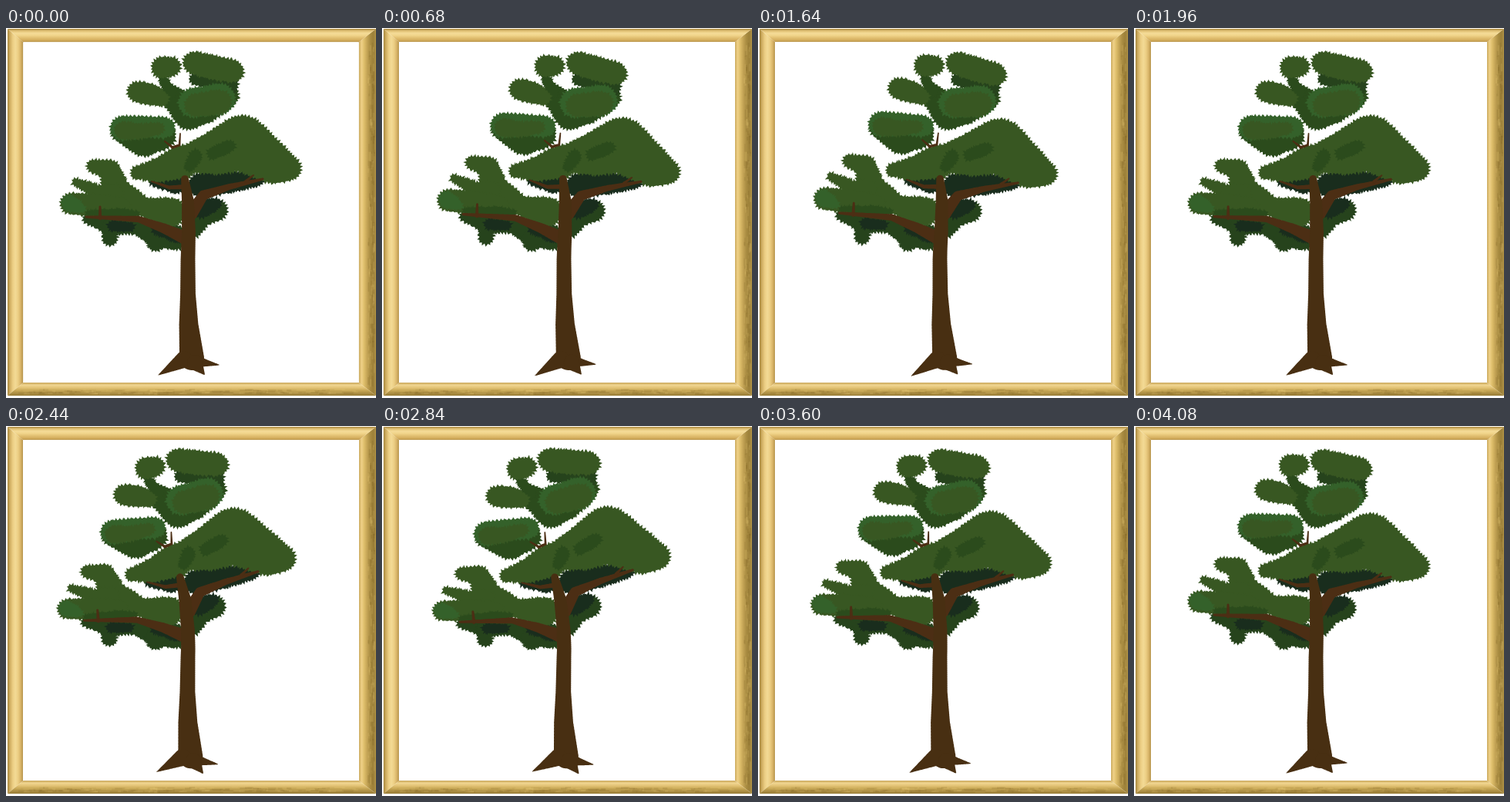
An HTML page with a canvas that plays this animation: 480x480 px, repeating every 4120 ms.

```html
<!DOCTYPE html>
<html lang="en">
<head>
<meta charset="utf-8">
<title>Swaying tree</title>
<style>
html, body { margin: 0; width: 100%; height: 100%; overflow: hidden; background: #fff; }
canvas { display: block; width: 480px; height: 480px; }
</style>
</head>
<body>
<canvas id="stage" width="480" height="480"></canvas>
<script>
const ctx = document.getElementById('stage').getContext('2d');
const LOOP = 4120, STEP = 40;
const LEAF = '#385722', GLOW = '#34612a', MID = '#2b4b1c', SHADE = '#26431c', DEEP = '#192d1d';
const BARK = '#482f12', BRANCH = '#4c2e14';

let seed = 11;
const rnd = () => (seed = (seed * 16807) % 2147483647) / 2147483647;

// A disc whose rim carries random leaf tips when spike > 0.
function disc(x, y, r, spike) {
  const n = 2 * Math.max(6, Math.round(r * 1.4));
  return Array.from({ length: n }, (_, i) => {
    const a = 2 * Math.PI * (i + (rnd() - .5) * .5 * Math.sign(spike)) / n;
    const d = r + spike * (i % 2 ? rnd() * 1.3 : -.5 - rnd() * .5);
    return [x + d * Math.cos(a), y + d * Math.sin(a)];
  });
}

// A chain of discs through "x,y,radius" nodes; gap is the spacing in radii.
function chain(color, text, gap, spike) {
  const nodes = text.split(' ').map(p => p.split(',').map(Number));
  const discs = [disc(...nodes[0], spike)];
  for (let i = 1; i < nodes.length; i++) {
    const [a, b] = [nodes[i - 1], nodes[i]];
    const n = Math.ceil(Math.hypot(b[0] - a[0], b[1] - a[1]) / (gap * (a[2] + b[2]) / 2));
    for (let k = 1; k <= n; k++) {
      const [x, y, r] = a.map((v, j) => v + (b[j] - v) * k / n);
      discs.push(disc(x, y, r, spike));
    }
  }
  shapes.push({ color, discs });
}

const shapes = [];
const leaf = (color, text) => chain(color, text, .42, 2.2);
const wood = (color, text) => chain(color, text, .3, 0);

// Low foliage behind the trunk
leaf(SHADE, '106,247,7 136,257,12 168,257,10 198,270,15 222,272,16');
leaf(SHADE, '135,258,11 135,273,10');
leaf(SHADE, '194,274,13 194,280,10');
leaf(DEEP, '138,257,7 162,258,6');
leaf(DEEP, '195,262,6 222,273,6');
leaf(SHADE, '245,263,9 255,244,13 274,236,14');
leaf(DEEP, '253,235,12 272,228,8');
leaf(DEEP, '252,204,16 285,200,15 326,197,9');
leaf(DEEP, '190,200,5 222,201,14');

// Left crown
leaf(LEAF, '113,179,9 136,184,13 142,212,19 180,233,13 214,239,19');
leaf(LEAF, '91,200,6 118,212,9 140,214,12');
leaf(LEAF, '84,228,14 120,230,15 150,232,12');
leaf(GLOW, '82,227,11 98,234,6');
leaf(MID, '106,240,4 150,240,6 170,241,4');

// Right crown and the part before the trunk
leaf(LEAF, '242,169,20 278,160,30 306,149,36 345,175,27 366,182,17');
leaf(LEAF, '170,188,9 200,184,16 228,174,22');
leaf(MID, '246,166,9 238,180,7');
leaf(MID, '268,163,8 290,153,8');

// Left middle clump
leaf(MID, '152,133,16 178,147,20 204,140,17');
leaf(GLOW, '151,130,16 180,128,14 206,129,14');
leaf(LEAF, '152,133,12 176,134,10 198,130,8');

// Top clumps
leaf(MID, '214,87,14 238,110,22 262,105,17 287,88,15');
leaf(MID, '203,66,6 214,84,8');
leaf(LEAF, '171,83,14 188,86,14 202,92,10');
leaf(LEAF, '202,51,14 214,50,13');
leaf(SHADE, '245,66,8 290,75,12');
leaf(LEAF, '244,45,15 268,51,16 294,56,15');
leaf(GLOW, '242,97,19 278,92,20');
leaf(LEAF, '246,100,15 277,96,16');

// Twigs, branches, trunk and roots
wood(BRANCH, '206,147,1 216,155,1.8 225,152,1.5 226,137,.9');
wood(BRANCH, '189,199,1 212,207,2.4 232,206,3');
wood(BRANCH, '122,247,2.2 122,232,1.5');
wood(BRANCH, '236,274,9 205,260,6.5 172,248,4.2 104,245,1.6');
wood(BRANCH, '240,240,9 256,217,6.5 290,206,4 333,196,1.6');
wood(BRANCH, '311,199,2 321,191,1');
wood(BARK, '232,196,5 236,225,8 237,265,9 236,300,9.5 236,345,10 237,385,12.5 241,428,16');
wood(BARK, '231,430,11 198,450,.6');
wood(BARK, '249,433,7 276,437,.6');
wood(BARK, '245,434,10 257,449,1');

const ease = x => (1 - Math.cos(Math.PI * x)) / 2;
const keys = [[0, 0], [1340, 20], [2770, -28], [LOOP, 0]];

function lean(time) {
  const i = keys.findIndex(k => time < k[0]);
  const [t0, a] = keys[i - 1], [t1, b] = keys[i];
  return a + (b - a) * ease((time - t0) / (t1 - t0));
}

// The crown bends and turns more with height; the roots tilt slightly.
function bend([x, y], s) {
  if (y < 290) {
    const u = (290 - y) / 250;
    return [x + s * u ** 1.3, y + s * .005 * u ** .4 * (x - 236)];
  }
  const k = Math.max(0, y - 300) / 150;
  return [x + s * .09 * k, y - s * .002 * k * (x - 235)];
}

function fill(color, outlines) {
  ctx.fillStyle = color;
  ctx.beginPath();
  for (const pts of outlines) {
    pts.forEach(([x, y], i) => i ? ctx.lineTo(x, y) : ctx.moveTo(x, y));
    ctx.closePath();
  }
  ctx.fill();
}

// Picture frame: four mitred bars, drawn once
const L = 2, T = 1, R = 480, B = 477, l = 22.5, t = 18.5, r = 457.5, b = 460;

function bar(corners, [x0, y0, x1, y1], colors) {
  const g = ctx.createLinearGradient(x0, y0, x1, y1);
  colors.split(' ').forEach((c, i, all) => g.addColorStop(i / (all.length - 1), c));
  fill(g, [corners]);
}

function grain(x, y, w, h, flat) {
  for (let i = 0; i < 150; i++) {
    const long = 4 + rnd() * 10, thin = 1 + rnd() * 1.5;
    ctx.fillStyle = rnd() < .5 ? 'rgba(110,80,25,.14)' : 'rgba(245,215,135,.13)';
    ctx.fillRect(x + rnd() * w, y + rnd() * h, flat ? long : thin, flat ? thin : long);
  }
}

function drawFrame() {
  bar([[L, T], [l, t], [l, b], [L, B]], [L, 0, l, 0], '#a8883e #d2b064 #ecce84 #f3da95 #ecce84 #d8b468 #b08f48');
  bar([[R, T], [r, t], [r, b], [R, B]], [r, 0, R, 0], '#c4a254 #efd188 #dcbc68 #c2a254 #aa8d42 #9c8039 #ae9146');
  grain(469, 16, 8, 440, false);
  bar([[L, T], [R, T], [r, t], [l, t]], [0, T, 0, t], '#a8873c #e2c276 #f5dc98 #f0d48a #e2c072 #d4ae5e #b5924a');
  bar([[L, B], [R, B], [r, b], [l, b]], [0, b, 0, B], '#c8a558 #f0d590 #e2c274 #c8a856 #ad8f44 #987c36');
  grain(12, 468, 440, 6, true);
}

function draw() {
  const time = Math.floor(performance.now() % LOOP / STEP) * STEP;
  const s = lean(time);
  ctx.fillStyle = '#fff';
  ctx.fillRect(l, t, r - l, b - t);
  for (const { color, discs } of shapes) fill(color, discs.map(d => d.map(p => bend(p, s))));
  requestAnimationFrame(draw);
}

ctx.fillStyle = '#fff';
ctx.fillRect(0, 0, 480, 480);
drawFrame();
draw();
</script>
</body>
</html>
```
